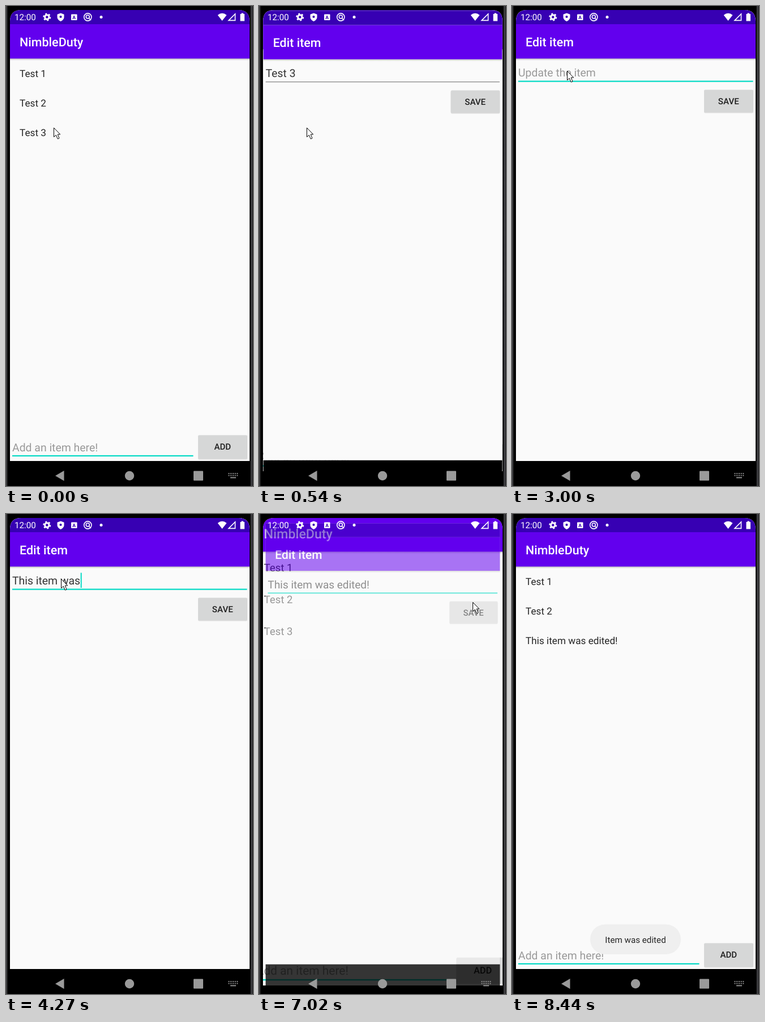
An HTML page for the animation above (8.88 s loop, 436x845 px).

```html
<!DOCTYPE html>
<html lang="en">
<head>
<meta charset="utf-8">
<title>To-do list</title>
<style>
  html, body { margin: 0; width: 100%; height: 100%; overflow: hidden; background: #000; }
  svg { display: block; width: 436px; height: 845px;
    background: linear-gradient(90deg, #55555a 0, #222 2px, #000 4px, #000 431px, #4a4a4e 433px, #1c1c1e 436px); }
  text { font-family: Roboto, sans-serif; white-space: pre; text-rendering: geometricPrecision; }
  .title { font-size: 21.5px; font-weight: 500; fill: #fff; }
  .item { font-size: 17.2px; fill: #262626; }
  .field { font-size: 19.4px; fill: #333; }
  .hint { font-size: 19.4px; fill: #999; }
  .label { font-size: 15.1px; font-weight: 500; fill: #1f1f1f; text-anchor: middle; }
  .small { font-size: 15.2px; }
  .teal { fill: #03dac5; }
</style>
</head>
<body>
<svg viewBox="0 0 436 845">
  <defs>
    <clipPath id="screen"><path d="M7 845V27Q7 7 27 7H410Q430 7 430 27V845Z"/></clipPath>
    <linearGradient id="shade" x2="0" y2="1">
      <stop stop-opacity=".26"/><stop offset="1" stop-opacity="0"/>
    </linearGradient>
    <g id="window">
      <path fill="#fafafa" d="M7 7H430V801H7Z"/>
      <path fill="url(#shade)" d="M7 92H430V96H7Z"/>
      <path fill="#6200ee" d="M7 32H430V92.5H7Z"/>
      <path fill="#3700b3" d="M7 7H430V32H7Z"/>
    </g>
  </defs>

  <g clip-path="url(#screen)">
    <g id="list">
      <use href="#window"/>
      <path d="M7 801H430V853H7Z"/>
      <text class="title" x="24" y="71">NimbleDuty</text>
      <text class="item" x="24" y="125">Test 1</text>
      <text class="item" x="24" y="177">Test 2</text>
      <text class="item" x="24" y="229" id="third"></text>
      <text class="hint" x="11" y="783.5">Add an item here!</text>
      <rect class="teal" x="11" y="790.8" width="319.5" height="2.2"/>
      <rect class="teal" x="11.6" y="763" width="2" height="27" id="listCaret"/>
      <rect x="339" y="757" width="87" height="41.5" rx="2" opacity=".12"/>
      <rect x="339" y="755.5" width="87" height="41.5" rx="2" fill="#d6d7d7"/>
      <text class="label" x="382.3" y="781.3">ADD</text>
    </g>
    <path id="dim" d="M7 7H430V816H7Z"/>

    <g id="edit">
      <use href="#window"/>
      <text class="title" x="24" y="71">Edit item</text>
      <text class="hint" x="11" y="124.3" id="editHint">Update the item</text>
      <text class="field" x="11" y="124.3" id="entry"></text>
      <rect x="11" width="414.5" id="underline"/>
      <rect class="teal" y="103.5" width="2" height="26.5" id="editCaret"/>
      <rect x="339" y="149" width="87" height="39.5" rx="2" opacity=".12"/>
      <rect x="339" y="147.5" width="87" height="39.5" rx="2" fill="#d6d7d7"/>
      <text class="label" x="382.3" y="173">SAVE</text>
    </g>
    <path id="editNav" d="M7 801H430V853H7Z"/>

    <g id="toast">
      <rect x="138" y="722.5" width="160" height="52.5" rx="26" fill="#efefef"/>
      <text class="small" x="218" y="754.5" text-anchor="middle" fill="#262626">Item was edited</text>
    </g>
  </g>

  <g fill="#fff" stroke="#fff" stroke-width="0">
    <text class="small" x="15" y="25.3">12:00</text>
    <g fill="none">
      <circle cx="72.3" cy="19.5" r="3.7" stroke-width="3"/>
      <circle cx="72.3" cy="19.5" r="5.8" stroke-width="2.4" pathLength="12" stroke-dasharray="1"/>
    </g>
    <path d="M96.500 12.500l6 2.300v4.500c0 4-2.800 6.300-6 7.700c-3.200-1.400-6-3.700-6-7.700v-4.500z"/>
    <circle cx="96.500" cy="19" r="2.100" fill="#3700b3"/>
    <rect x="115" y="14.500" width="10.500" height="10.500" rx="1"/>
    <text x="120.200" y="23" font-size="8.500" font-weight="700" text-anchor="middle" style="fill:#3700b3">A</text>
    <g fill="none" stroke-width="1.600">
      <circle cx="144.300" cy="19.500" r="6.600"/>
      <circle cx="144.300" cy="19" r="3"/>
      <path d="M146 21L150 25"/>
      <path d="M404.500 14V25.400H393Z"/>
    </g>
    <circle cx="168" cy="19.500" r="2.500"/>
    <path d="M381.500 26L373.700 16Q381.500 9.500 389.500 16Z"/>
    <path d="M413.500 14H415.500V12.500H419V14H421V26.500H413.500Z"/>
  </g>

  <g fill="#9a9a9a">
    <path d="M87 827L102.500 818V836Z"/>
    <circle cx="218" cy="827" r="8.200"/>
    <rect x="331" y="818.500" width="17" height="17" rx="1"/>
    <g id="keys" fill="none" stroke="#8c8c8c" stroke-width="2">
      <path stroke-dasharray="2 1.700" d="M392.500 823H410M392.500 826.500H410"/>
      <path d="M396 830.300H406"/>
    </g>
  </g>

  <path id="mouse" fill="#fff" stroke="#000" d="M.5 .5V16.500L4.300 13.200L7.300 20L10 18.800L7.200 12H11.700Z"/>
</svg>

<script>
const LOOP = 8880, OPEN = 295, CLOSE = 6965, MOVE = 400;
const FOCUS = 1150, CARET_TO_END = 1250;
const el = {};
for (const node of document.querySelectorAll('svg [id]')) el[node.id] = node;

const clamp = (v) => Math.min(1, Math.max(0, v));
const ramp = (t, start, length) => clamp((t - start) / length);
const show = (node, on) => node.setAttribute('visibility', on ? 'visible' : 'hidden');
const fade = (node, alpha) => node.setAttribute('opacity', alpha);
const zoom = (node, s) =>
  node.setAttribute('transform', `translate(218.5 430) scale(${s}) translate(-218.5 -430)`);

// Two joined Béziers: a quick start with a very long settle.
const bezier = (u, [a, b, c, d]) => {
  const v = 1 - u;
  return v * v * v * a + 3 * v * v * u * b + 3 * v * u * u * c + u * u * u * d;
};
function ease(x) {
  const [xs, ys] = x < 1 / 6
    ? [[0, 0.05, 0.1333, 1 / 6], [0, 0, 0.06, 0.4]]
    : [[1 / 6, 0.2083, 0.25, 1], [0.4, 0.82, 1, 1]];
  let low = 0, high = 1;
  for (let i = 0; i < 24; i++) {
    const mid = (low + high) / 2;
    if (bezier(mid, xs) < x) low = mid; else high = mid;
  }
  return bezier(low, ys);
}

// Keystrokes as [time, key]; '<' deletes.
const keys = [];
for (let i = 0; i < 6; i++) keys.push([1880 + i * 118, '<']);
[...'This item'].forEach((key, i) => keys.push([3050 + i * 85, key]));
const times = [3880, 3970, 4060, 4270, 4420, 4660, 4850, 5190, 5310, 5430, 5550, 5670, 5820, 6230];
[...' was es<dited!'].forEach((key, i) => keys.push([times[i], key]));

function typed(t) {
  let text = 'Test 3', last = CARET_TO_END;
  for (const [at, key] of keys) {
    if (at > t) break;
    text = key === '<' ? text.slice(0, -1) : text + key;
    last = at;
  }
  return { text, last };
}

const mousePath = [
  [780, 84, 214], [1080, 97, 114], [6440, 97, 114], [6860, 377, 155], [7180, 377, 155],
  [7350, 354, 200], [7510, 345, 330], [7700, 345, 330], [8290, 384, 846]
];
function mouseAt(t) {
  let from = mousePath[0];
  for (const to of mousePath) {
    if (t < to[0]) {
      const k = ramp(t, from[0], to[0] - from[0] || 1), s = k * k * (3 - 2 * k);
      return [1, 2].map((i) => from[i] + (to[i] - from[i]) * s);
    }
    from = to;
  }
  return from.slice(1);
}

function draw(t) {
  const opening = ease(ramp(t, OPEN, MOVE)), closing = ease(ramp(t, CLOSE, MOVE));
  const isClosing = t >= CLOSE;

  zoom(el.list, isClosing ? 1.1 - 0.1 * closing : 1 + 0.05 * opening);
  fade(el.dim, isClosing ? 0 : 0.07 * ramp(t, OPEN, 60));
  el.third.textContent = t < 7050 ? 'Test 3' : 'This item was edited!';
  show(el.listCaret, t >= 6940 && t < 8440 && (t - 6940) % 1000 < 500);

  const editScale = isClosing ? 1 - 0.1 * closing : 0.85 + 0.15 * opening;
  const alpha = isClosing ? 1 - ramp(t, CLOSE + 33, 50) : ramp(t, OPEN + 35, 50);
  zoom(el.edit, editScale);
  zoom(el.editNav, editScale);
  fade(el.edit, alpha);
  fade(el.editNav, 1 - (1 - alpha) ** 2);

  const { text, last } = typed(t), focused = t >= FOCUS;
  el.entry.textContent = text;
  show(el.editHint, !text);
  el.underline.setAttribute('fill', focused ? '#03dac5' : '#777');
  el.underline.setAttribute('y', focused ? 131.5 : 132);
  el.underline.setAttribute('height', focused ? 2.2 : 1.1);
  const caretX = t < CARET_TO_END || !text ? 0 : el.entry.getComputedTextLength();
  el.editCaret.setAttribute('x', 11.6 + caretX);
  show(el.editCaret, focused && !isClosing && (t < CARET_TO_END || (t - last) % 1000 < 490));

  show(el.keys, t < 290 || t >= 1300);
  fade(el.toast, ramp(t, 7080, 250));
  el.mouse.setAttribute('transform', `translate(${mouseAt(t)})`);
}

function tick() {
  draw(performance.now() % LOOP);
  requestAnimationFrame(tick);
}
tick();
</script>
</body>
</html>
```
